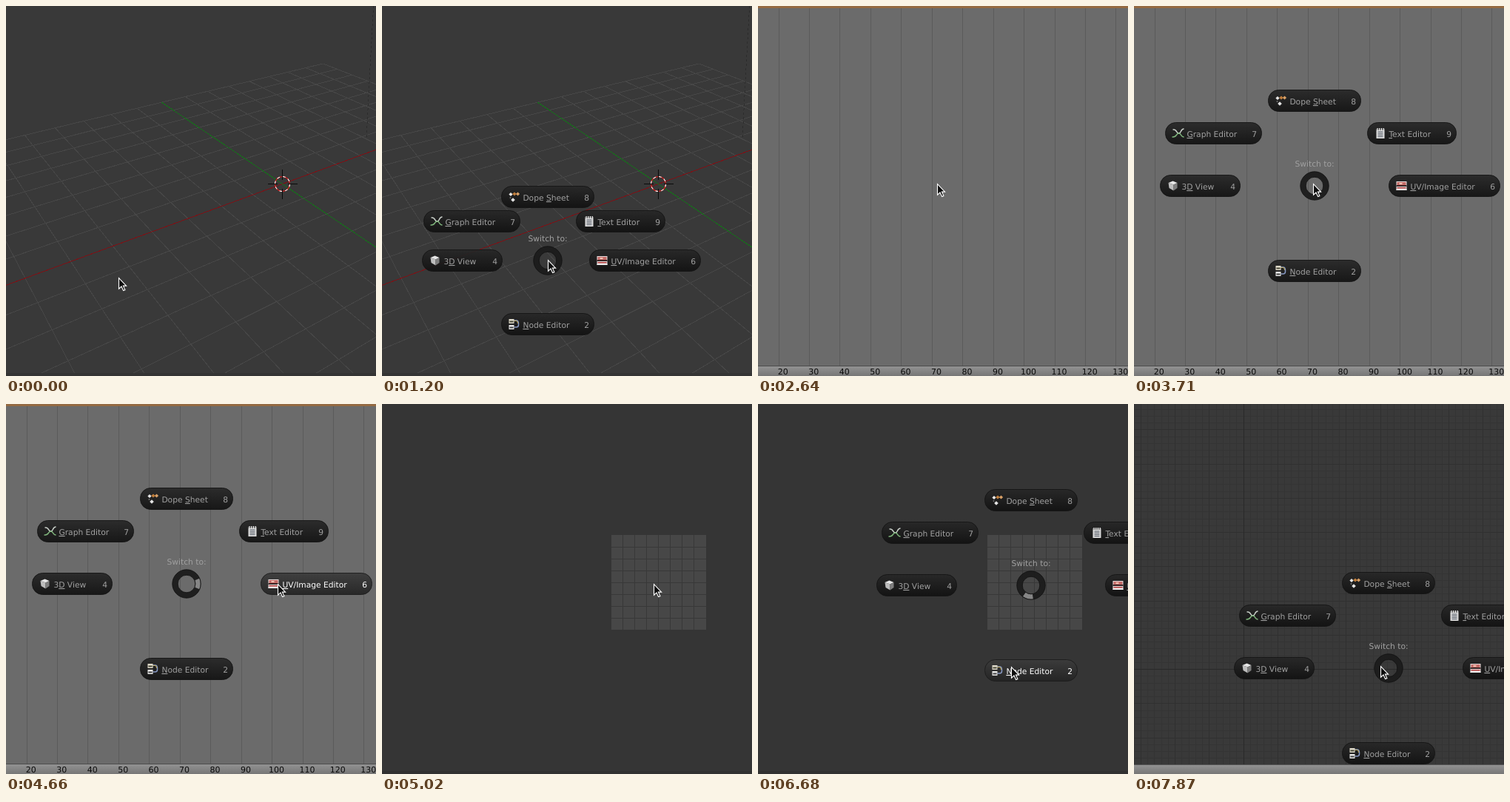
Write an HTML page that moves like this. It is 500 by 500 pixels and loops after 7.99 s.

```html
<!DOCTYPE html>
<html lang="en">
<head>
<meta charset="utf-8">
<title>Pie menu</title>
<style>
html, body { margin: 0; width: 100%; height: 100%; overflow: hidden; background: #393939; }
svg { display: block; width: 500px; height: 500px; }
text { font-family: "DejaVu Sans", sans-serif; font-size: 10.7px; fill: #a0a0a0; text-rendering: geometricPrecision; }
.u { text-decoration: underline; }
.on text { fill: #fff; }
.pill { fill: url(#dark); stroke: #141414; fill-opacity: .93; stroke-opacity: .9; }
.on .pill { fill: url(#lit); stroke: #1c1c1c; }
.ruler text { font-size: 11px; fill: #0a0a0a; text-anchor: middle; }
.crisp { shape-rendering: crispEdges; fill: none; }
</style>
</head>
<body>
<svg id="stage" viewBox="0 0 500 500">
  <defs>
    <linearGradient id="dark" x2="0" y2="1"><stop stop-color="#272727"/><stop offset="1" stop-color="#111"/></linearGradient>
    <linearGradient id="lit" x2="0" y2="1"><stop stop-color="#3c3c3c"/><stop offset="1" stop-color="#232323"/></linearGradient>
    <linearGradient id="bar" x2="0" y2="1"><stop stop-color="#929292"/><stop offset="1" stop-color="#767676"/></linearGradient>
  </defs>
  <g id="view3d"></g>
  <g id="dope"></g>
  <g id="uv"></g>
  <g id="node"></g>
  <g id="pie">
    <circle r="15.5" fill="none" stroke="#1c1c1c" stroke-width="7.5" stroke-opacity=".95"/>
    <path id="wedge" fill="none" stroke="#868686" stroke-width="6.5"/>
    <circle r="19.2" fill="none" stroke="#111" stroke-width=".8"/>
    <circle r="11.8" fill="none" stroke="#111" stroke-width=".8"/>
    <text y="-26" text-anchor="middle">Switch to:</text>
    <g id="items"></g>
  </g>
  <path id="cursor" d="M.5 .5V15.2L4 12L6.6 17.6L8.9 16.6L6.4 11.1H10.6Z" fill="#0c0c0c" stroke="#fff" stroke-width="1.1"/>
</svg>
<script>
const $ = id => document.getElementById(id);
const rect = (x, y, w, h, fill) => `<rect x="${x}" y="${y}" width="${w}" height="${h}" fill="${fill}"/>`;
const lines = (d, color, extra = '') => `<path class="crisp" d="${d}" stroke="${color}" ${extra}/>`;
const range = (a, b) => Array.from({ length: b - a + 1 }, (_, i) => a + i);
const mid = v => Math.floor(v) + .5;

// Ground plane: origin on screen, vanishing points of both axes, depth per unit
const O = [373.5, 240.5], VX = [1554, -192], VY = [-266, -192], GX = .0325, GY = .0428;
function project(x, y) {
  const a = x * GX, b = y * GY;
  return [0, 1].map(i => ((O[i] + a * VX[i] + b * VY[i]) / (1 + a + b)).toFixed(2));
}
const seg = (x0, y0, x1, y1) => `M${project(x0, y0)}L${project(x1, y1)}`;

function drawView3d() {
  const floor = range(-8, 8).filter(k => k).map(k => seg(-8, k, 8, k) + seg(k, -8, k, 8)).join('');
  const arm = 'M353.5 240.5h13M380.5 240.5h13M373.5 221v14M373.5 247v14';
  const ring = `<circle cx="373.5" cy="240.5" r="10" fill="none" stroke-width="1.1"`;
  $('view3d').innerHTML = rect(0, 0, 500, 500, '#393939')
    + lines(floor, '#474747')
    + lines(seg(-8, 0, 8, 0), '#7f1015') + lines(seg(0, -8, 0, 8), '#15701a')
    + lines('M496.5 0L487 178', '#2c2c2c', 'stroke-dasharray="3 3"')
    + ring + ' stroke="#f01414"/>' + ring + ' stroke="#fff" stroke-dasharray="3.927"/>'
    + lines(arm, '#0a0a0a') + rect(0, 496, 500, 4, '#343434');
}

function drawDope() {
  const xs = range(0, 11).map(i => 28 + i * 41.45);
  const labels = xs.map((x, i) => `<text x="${(x + 5.8).toFixed(1)}" y="497.5">${20 + i * 10}</text>`).join('');
  $('dope').innerHTML = rect(0, 0, 500, 500, '#6b6b6b')
    + lines(xs.map(x => `M${mid(x)} 0V487`).join(''), '#5b5b5b')
    + rect(0, 0, 500, 3, '#946a42')
    + rect(0, 486, 500, 1, '#4c4c4c') + rect(0, 487, 500, 13, 'url(#bar)')
    + `<g class="ruler">${labels}</g>`;
}

function drawUv() {
  const cuts = range(1, 7).map(i => `M${309.5 + i * 16} 177V305M310 ${177.5 + i * 16}H438`).join('');
  $('uv').innerHTML = rect(0, 0, 500, 500, '#353535') + rect(310, 177, 128, 128, '#474747')
    + lines(cuts, '#383838') + rect(0, 496, 500, 4, '#313131');
}

function drawNode() {
  const mesh = step => range(-40, 40).map(i => {
    const x = mid(148 + i * step), y = mid(358.6 + i * step);
    return (x > 0 && x < 500 ? `M${x} 0V487` : '') + (y > 0 && y < 487 ? `M0 ${y}H500` : '');
  }).join('');
  $('node').innerHTML = rect(0, 0, 500, 500, '#393939')
    + lines(mesh(9.25), '#343434') + lines(mesh(46.25), '#303030')
    + lines('M148.5 0V487M0 358.5H500', '#292929')
    + rect(0, 487, 500, 1, '#555') + rect(0, 488, 500, 12, 'url(#bar)');
}

const diamond = (x, y, r, fill) => `<path d="M${x - r} ${y}l${r} ${-r}l${r} ${r}l${-r} ${r}Z" fill="${fill}"/>`;
const curve = (d, color, w = 1.5) => `<path d="${d}" fill="none" stroke="${color}" stroke-width="${w}"/>`;

// Icons are drawn around their own centre
const icons = {
  dope: diamond(-4.5, -3.5, 2.6, '#e8e8e8') + diamond(.5, -4, 2.6, '#c98643') + diamond(5, -4, 2.6, '#d9a066')
    + rect(-2, -4.5, 5, 1, '#b87432') + diamond(-1.5, 4, 2.8, '#e4e4e4') + diamond(-5, 1, 1.2, '#777'),
  graph: curve('M-7 -5C-1 -6 -3 0 1 0S3 -6 8 -6', '#c9cfc9') + curve('M-8 5C-1 6 -3 0 1 0S3 5 8 5', '#7fb57c'),
  text: rect(-5, -6, 11, 13, '#dcdcdc') + rect(-5, -6, 11, 2, '#555')
    + range(0, 3).map(i => rect(-4 + i * 2.7, -7, 1.2, 3.5, '#f5f5f5')).join('')
    + range(0, 3).map(i => rect(-3, -2.5 + i * 2.2, 7, 1, '#4d5560')).join(''),
  cube: '<path d="M-6 -4L0 -6.5L6 -4L1 -1.5Z" fill="#e6e6e6"/><path d="M-6 -4L1 -1.5V6.5L-5 3Z" fill="#bdbdbd"/><path d="M6 -4L1 -1.5V6.5L6 3Z" fill="#7e7e7e"/>',
  image: rect(-7, -6, 14, 12, '#e6dede') + rect(-6, -5, 12, 4, '#c46a66') + rect(-3, -4, 4, 2, '#f0c5b5')
    + rect(-7, -1, 14, 2, '#3a2626') + rect(-6, 2, 12, 1.5, '#b33a3a') + rect(-7, 4.5, 14, 1.5, '#f2f2f2'),
  node: curve('M-1 -5H3Q6 -5 6 -1V1Q6 4 3 4H0', '#8899c4') + curve('M0 -4.5H3Q5 -4.5 5 -1', '#c9b25a', 1)
    + rect(-7, -7, 7, 6, '#ddd8c8') + rect(-6, -4.5, 5, 2, '#4a4a3a')
    + rect(-7, 1, 7, 6, '#e4e4e4') + rect(-6, 3.5, 5, 2, '#444')
};

// label with hotkey in brackets, number, left, top, width, icon, sector (eighths clockwise from up)
const items = [
  ['Dope [S]heet', 8, -63, -130, 126, 'dope', 0],
  ['[T]ext Editor', 9, 71, -86, 121, 'text', 1],
  ['[U]V/Image Editor', 6, 100, -15, 151, 'image', 2],
  ['[N]ode Editor', 2, -63, 100, 126, 'node', 4],
  ['3[D] View', 4, -209, -15, 109, 'cube', 6],
  ['[G]raph Editor', 7, -202, -86, 131, 'graph', 7]
];

function drawItems() {
  $('items').innerHTML = items.map(([label, key, , , w, icon]) => `<g>
    <rect class="pill" x=".5" y=".5" width="${w - 1}" height="29" rx="14"/>
    <g transform="translate(17.5 15)">${icons[icon]}</g>
    <text x="29.4" y="20">${label.replace('[', '<tspan class="u">').replace(']', '</tspan>')}</text>
    <text x="${w - 7}" y="20" text-anchor="end">${key}</text></g>`).join('');
}

const LOOP = 7990;
const scenes = [[0, 'view3d'], [2640, 'dope'], [5020, 'uv'], [6920, 'node']];
// open, fully open, close, centre
const pies = [
  [1200, 1320, 2640, 224, 344],
  [3710, 3710, 5020, 244, 243],
  [5490, 5610, 6920, 369, 245],
  [7400, 7510, LOOP, 344, 357]
];
// first step, last step, step count, tip position reached
const moves = [
  [600, 960, 4, 224, 343],
  [1920, 2400, 5, 242, 240],
  [4430, 4660, 3, 367, 243],
  [6210, 6680, 5, 342, 355],
  [7870, 7870, 1, 333, 354]
];

function cursorAt(t) {
  let p = [152, 367];
  for (const [start, end, n, x, y] of moves) {
    if (t < start) break;
    const k = t >= end ? n : Math.floor((t - start) / ((end - start) / (n - 1))) + 1;
    const f = k / n, e = f * f * (3 - 2 * f);
    p = [p[0] + (x - p[0]) * e, p[1] + (y - p[1]) * e].map(Math.round);
  }
  return p;
}

function showPie(t, [px, py]) {
  const pie = pies.find(p => t >= p[0] && t < p[2]);
  $('pie').style.display = pie ? '' : 'none';
  if (!pie) return;
  const [, full, , cx, cy] = pie;
  const spread = t < full ? .75 : 1;
  const dx = px - cx, dy = py - cy, far = Math.hypot(dx, dy) > 12;
  const angle = Math.atan2(dx, -dy);
  const sector = far ? (Math.round(angle / (Math.PI / 4)) + 8) % 8 : -1;
  $('pie').setAttribute('transform', `translate(${cx} ${cy})`);

  const rim = a => [15.5 * Math.sin(a), -15.5 * Math.cos(a)].map(v => v.toFixed(2));
  const half = Math.PI / 8;
  $('wedge').setAttribute('d', far ? `M${rim(angle - half)}A15.5 15.5 0 0 1 ${rim(angle + half)}` : '');

  items.forEach(([, , x, y, w, , dir], i) => {
    const g = $('items').children[i];
    const ox = (x + w / 2) * spread - w / 2, oy = (y + 15) * spread - 15;
    g.setAttribute('transform', `translate(${Math.round(ox)} ${Math.round(oy)})`);
    g.setAttribute('class', dir === sector ? 'on' : '');
  });
}

function render(t) {
  const current = scenes.filter(s => t >= s[0]).pop()[1];
  for (const [, id] of scenes) $(id).style.display = id === current ? '' : 'none';
  const tip = cursorAt(t);
  showPie(t, tip);
  $('cursor').setAttribute('transform', `translate(${tip})`);
}

function tick() {
  render(performance.now() % LOOP);
  requestAnimationFrame(tick);
}

drawView3d();
drawDope();
drawUv();
drawNode();
drawItems();
tick();
</script>
</body>
</html>
```
